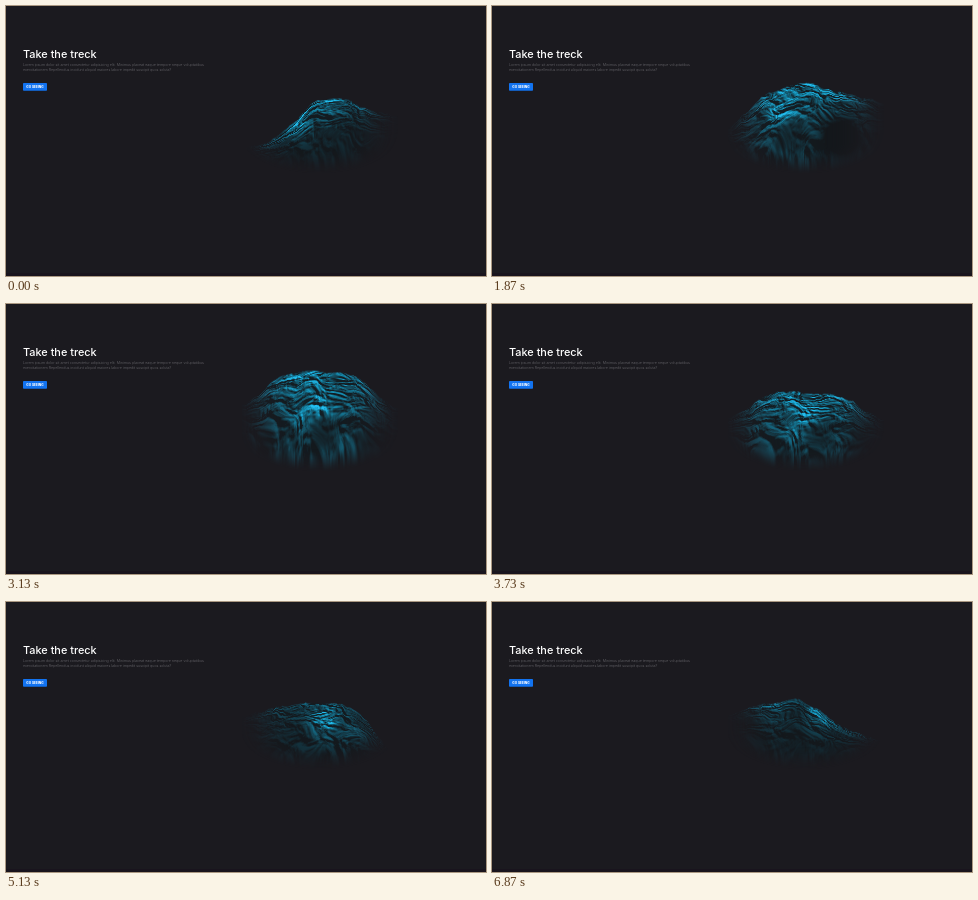
Animation, 480 px wide and 270 px high, one loop 6940 ms. Source, as an HTML page with a canvas:

```html
<!DOCTYPE html>
<html lang="en">
<head>
<meta charset="utf-8">
<title>Take the treck</title>
<style>
  html, body { margin: 0; width: 100%; height: 100%; overflow: hidden; background: #1b1a1f; }
  #stage { position: relative; width: 480px; height: 270px; overflow: hidden; background: #1b1a1f; }
  svg, canvas { position: absolute; left: 0; top: 0; }
  canvas { left: 236px; top: 48px; }
  text { font-family: Inter, "Open Sans", sans-serif; }
</style>
</head>
<body>
<div id="stage">
  <canvas id="land" width="160" height="130"></canvas>
  <svg width="480" height="270" viewBox="0 0 480 270">
    <rect y="267" width="480" height="3" fill="#19141d"/>
    <text x="17" y="52" font-size="10.9" font-weight="500" fill="#fff">Take the treck</text>
    <g font-size="3.64" font-weight="300" fill="#6c6b70">
      <text x="17" y="59.7">Lorem ipsum dolor sit amet consectetur adipisicing elit. Minimus placeat eaque tempore neque voluptatibus</text>
      <text x="17" y="65.3">exercitationem Repellendus incidunt aliquid maiores labore impedit suscipit quos soluta?</text>
    </g>
    <rect x="17" y="77" width="24" height="7.8" rx="0.8" fill="#1273f0"/>
    <text x="29" y="82.1" font-size="3.2" font-weight="800" fill="#fff" text-anchor="middle">GO SEEING</text>
  </svg>
</div>
<script>
const LOOP = 6940, STEP = LOOP / 104, SPIN = 0.0005;
const LEFT = 236, TOP = 48, W = 160, H = 130, MID = 313, RADIUS = 70;
const ROCK = [19, 23, 27], LIGHT = [2, 160, 204];

// at: ms; top: skyline every 18px from x=250; glow: rim light, its depth, wall light;
// a, b: pools of light or shade as x, y, radius, strength
const poses = [
  { at: 0, top: [138, 132, 117, 99, 92, 93, 101, 106], glow: [.42, 8, .06], a: [290, 118, 13, .5], b: [322, 103, 18, .22] },
  { at: 1000, top: [125, 98, 82, 72, 69, 77, 80, 80], glow: [.36, 13, .22], a: [295, 97, 16, .5], b: [328, 125, 25, -.5] },
  { at: 1870, top: [110, 92, 83, 78, 78, 84, 87, 92], glow: [.42, 17, .24], a: [290, 108, 13, .4], b: [350, 130, 25, -.42] },
  { at: 2600, top: [88, 70, 63, 60, 60, 62, 72, 92], glow: [.42, 24, .26], a: [302, 99, 14, .4], b: [372, 135, 18, -.2] },
  { at: 3730, top: [108, 96, 89, 89, 92, 92, 97, 108], glow: [.42, 16, .22], a: [315, 117, 16, .35], b: [372, 138, 18, -.2] },
  { at: 5130, top: [111, 106, 103, 102, 102, 104, 115, 140], glow: [.25, 8, .08], a: [320, 119, 14, .55], b: [345, 132, 13, .35] },
  { at: 6870, top: [109, 102, 101, 97, 104, 119, 128, 134], glow: [.42, 4, .06], a: [330, 113, 15, .35], b: [280, 110, 16, .16] }
];
const swells = [[1300, -4], [3050, -5], [4470, 6], [5800, -3]];

const clamp = (v, lo, hi) => Math.min(hi, Math.max(lo, v));
const lerp = (a, b, k) => a + (b - a) * k;
const smooth = k => k * k * (3 - 2 * k);
const mixList = (p, q, k) => p.map((v, i) => lerp(v, q[i], k));

function hash(x, y) {
  const s = Math.sin(x * 127.1 + y * 311.7) * 43758.5453;
  return s - Math.floor(s);
}

function noise(x, y) {
  const i = Math.floor(x), j = Math.floor(y);
  const u = smooth(x - i), v = smooth(y - j);
  return lerp(lerp(hash(i, j), hash(i + 1, j), u),
              lerp(hash(i, j + 1), hash(i + 1, j + 1), u), v);
}

// Warped, ridged height map over -1.6..1.6
const N = 320, SPAN = 1.6;
const ground = new Float32Array(N * N);
for (let j = 0; j < N; j++) {
  for (let i = 0; i < N; i++) {
    const x = i / N * 13, y = j / N * 13;
    const wx = x + noise(x + 40, y) * 1.2, wy = y + noise(x, y + 70) * 1.2;
    let sum = 0, amp = .5, f = 1;
    for (let o = 0; o < 4; o++) {
      sum += amp * (1 - Math.abs(2 * noise(wx * f + o * 17, wy * f) - 1));
      amp *= .55;
      f *= 2.1;
    }
    ground[j * N + i] = sum;
  }
}

function height(u, v) {
  const x = clamp((u / SPAN + 1) * N / 2, 0, N - 2), y = clamp((v / SPAN + 1) * N / 2, 0, N - 2);
  const i = Math.floor(x), j = Math.floor(y), n = j * N + i;
  return lerp(lerp(ground[n], ground[n + 1], x - i),
              lerp(ground[n + N], ground[n + N + 1], x - i), y - j);
}

function poseAt(t) {
  let n = 0;
  while (n < poses.length - 2 && t >= poses[n + 1].at) n++;
  const p = poses[n], q = poses[n + 1];
  const k = clamp((t - p.at) / (q.at - p.at), 0, 1);
  const pose = {};
  for (const part of ["top", "glow", "a", "b"]) pose[part] = mixList(p[part], q[part], k);
  pose.lift = swells.reduce((s, [at, dy]) => s + dy * Math.exp(-(((t - at) / 220) ** 2)), 0);
  return pose;
}

function skyline(top, x) {
  const s = clamp((x - 250) / 18, -.6, 7.6), i = clamp(Math.floor(s), 0, 6), k = s - i;
  if (k < 0 || k > 1) return lerp(top[i], top[i + 1], k);
  const before = top[Math.max(0, i - 1)], after = top[Math.min(7, i + 2)];
  const m = (top[i + 1] - before) / 2, n = (after - top[i]) / 2;
  return lerp(top[i], top[i + 1], smooth(k)) + m * k * (1 - k) ** 2 - n * k * k * (1 - k);
}

const pool = ([cx, cy, r, gain], x, y) =>
  gain * Math.exp(-((x - cx) ** 2 + (y - cy) ** 2) / (r * r));

// A hollow in the front wall that turns with the land
function hollow(turn, x, y) {
  const dx = (x - MID - 35 * Math.sin(turn)) / 16, dy = (y - 131) / 17;
  return Math.max(0, Math.cos(turn)) * Math.exp(-(dx ** 4) - dy ** 4);
}

const ctx = document.getElementById("land").getContext("2d");
const image = ctx.createImageData(W, H);

function draw(t) {
  const { top, glow: [rim, depth, wall], a, b, lift } = poseAt(t);
  const turn = t * SPIN, c = Math.cos(turn), s = Math.sin(turn);
  const land = (x, y) => height(x * c - y * s, x * s + y * c);
  image.data.fill(0);
  for (let i = 0; i < W; i++) {
    const x = LEFT + i + .5, across = (x - MID) / RADIUS;
    const edge = Math.exp(-(((x - MID) / 54) ** 4));
    const crest = skyline(top, x) + lift - (land(across, -.5) - .72) * 5;
    const foot = 169 - 16 * across * across;
    for (let j = 0; j < H; j++) {
      const y = TOP + j + .5, drop = y - crest;
      if (drop < -.7) continue;
      const fade = smooth(clamp((foot - y) / 26, 0, 1));
      const alpha = edge * fade * clamp((drop + .7) / 2, 0, 1);
      if (alpha < .01) continue;
      // The top lies back in perspective, the wall below stands steep
      const part = clamp(drop / Math.max(20, foot - crest), 0, 1);
      const near = -.8 + 1.4 * (1 - (1 - part) ** 2.4);
      const slope = land(across + .008, near - .02) - land(across - .008, near + .02);
      const fold = clamp(.74 + slope * 5.5, .08, 1.9);
      const lit = wall + rim * Math.exp(-Math.max(0, drop) / depth) + pool(a, x, y) + pool(b, x, y);
      const glow = clamp(lit * fold * (1 - .75 * hollow(turn - 1.4, x, y)), 0, 1.05);
      const n = (j * W + i) * 4;
      for (let k = 0; k < 3; k++) image.data[n + k] = ROCK[k] + LIGHT[k] * glow;
      image.data[n] += 40 * Math.max(0, glow - .7);
      image.data[n + 3] = 255 * alpha;
    }
  }
  ctx.putImageData(image, 0, 0);
}

let shown = -1;
function tick() {
  const step = Math.floor((performance.now() % LOOP + 5) / STEP) % 104;
  if (step !== shown) draw((shown = step) * STEP);
  requestAnimationFrame(tick);
}
tick();
</script>
</body>
</html>
```
